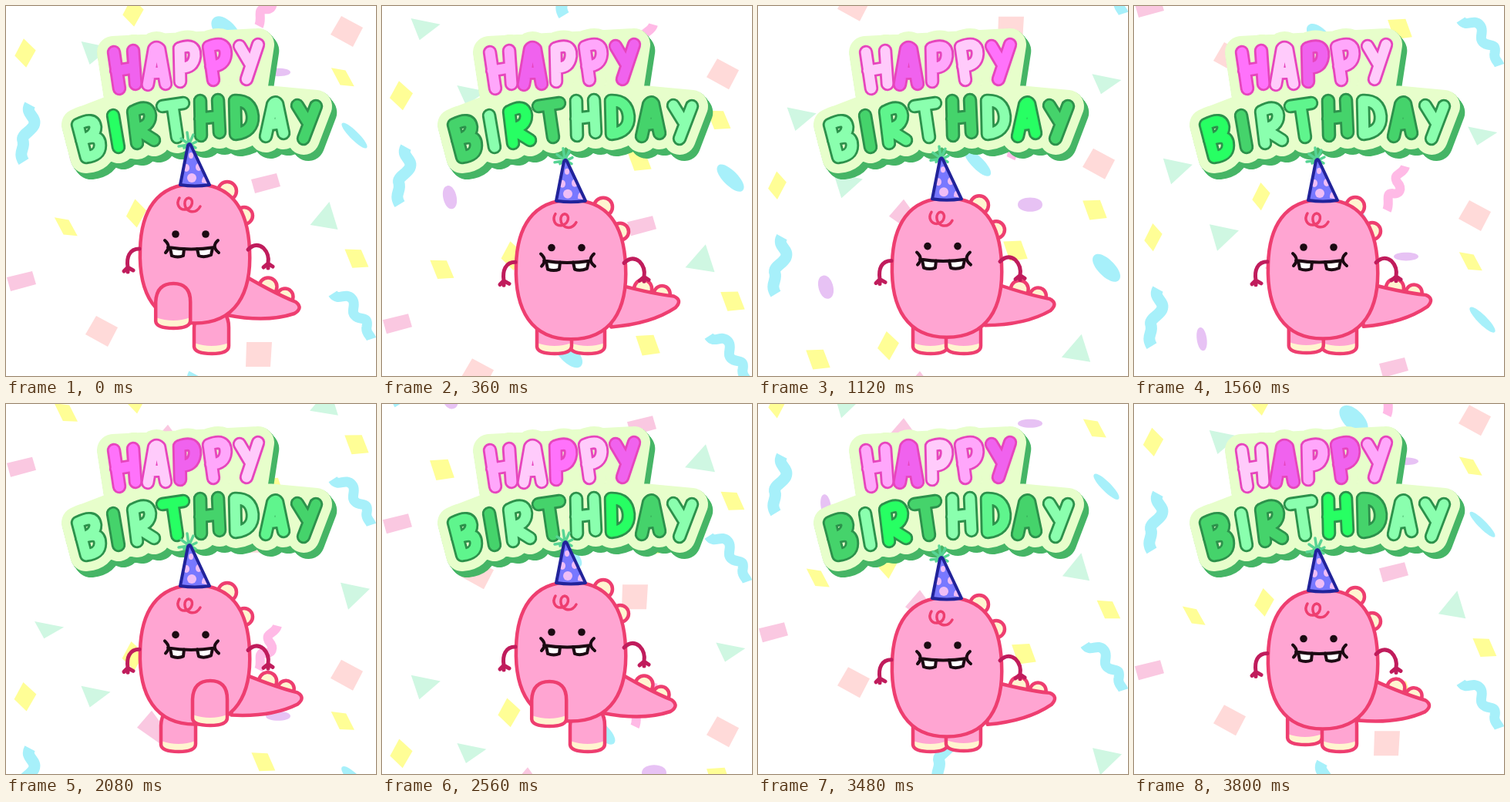
Animation of 480x480 px, one loop 3840 ms. Source, as an HTML page:

```html
<!DOCTYPE html>
<html lang="en">
<head>
<meta charset="utf-8">
<title>Happy Birthday</title>
<style>
html, body { margin: 0; width: 100%; height: 100%; overflow: hidden; background: #fff; }
svg { display: block; width: 100vw; height: 100vh; }
path, line { stroke-linecap: round; stroke-linejoin: round; }
.ink { fill: none; }
.ribbon { fill: none; stroke-linecap: butt; }
.skin { fill: #ffa5d2; stroke: #ee3e70; stroke-width: 4.5; }
.horn { fill: #fff5d0; stroke: #ee3e70; stroke-width: 4.5; }
.arm { fill: none; stroke: #c01c5c; stroke-width: 5; }
.face { fill: none; stroke: #1b0a12; stroke-width: 4; }
</style>
</head>
<body>
<svg viewBox="0 0 480 480" role="img" aria-label="Happy Birthday">
  <defs>
    <g id="leg">
      <path fill="#ffa5d2" d="M-22 -9 V-34 Q-21 -58 1 -58 Q23 -58 23 -34 V-10 Q23 0 1 0 Q-21 0 -22 -9Z"/>
      <path fill="#fff5d0" d="M-22 -14 Q1 -6 23 -14 V-10 Q23 0 1 0 Q-21 0 -22 -9Z"/>
      <path fill="none" stroke="#ee3e70" stroke-width="4.5" d="M-22 -9 V-34 Q-21 -58 1 -58 Q23 -58 23 -34 V-10 Q23 0 1 0 Q-21 0 -22 -9Z"/>
    </g>
  </defs>
  <g id="confetti"></g>
  <g id="sign"></g>
  <g id="back"></g>
  <g id="tail">
    <circle class="horn" cx="340" cy="364" r="11.5"/>
    <circle class="horn" cx="362" cy="377" r="10.5"/>
    <path class="skin" d="M298 343 Q344 371 376 384 Q386 392 374 399 Q338 411 287 401Z"/>
  </g>
  <g id="body">
    <circle class="horn" cx="287" cy="240" r="12"/>
    <circle class="horn" cx="309" cy="272" r="11"/>
    <path class="skin" d="M245 231 C295 231 314 267 316 316 C319 374 297 411.500 245 411.500 C194 411.500 172 374 174 316 C175 267 195 231 245 231Z"/>
    <path fill="none" stroke="#ee3e70" stroke-width="3.5" d="M225 249 C220 257 225 265 233 264 C243 262 244 250 237 249 C230 250 230 262 238 266 Q247 269 252 260"/>
    <g id="hat">
      <path fill="none" stroke="#57d494" stroke-width="3.5" d="M237 180 L224 182 M237 179 L227 172 M237 178 L235 164 M238 178 L243 167 M239 180 L247 176 M237 180 L231 184 M239 180 L246 184"/>
      <path fill="#7878ff" d="M236 181 Q238 177 240 181 L264 232 Q245 235 226 232Z"/>
      <g fill="#efbdf6">
        <ellipse cx="240" cy="194" rx="3" ry="4"/><ellipse cx="234" cy="210" rx="4" ry="5"/>
        <ellipse cx="250" cy="209" rx="4" ry="5"/><circle cx="241" cy="223" r="6"/>
        <path d="M254 229 Q254 219 260 222 L263 231Z"/>
      </g>
      <path fill="none" stroke="#21239a" stroke-width="4" d="M236 181 Q238 177 240 181 L264 232 Q245 235 226 232Z"/>
    </g>
  </g>
  <g id="front"></g>
  <g id="look">
    <circle cx="220" cy="296" r="4.8" fill="#1b0a12"/><circle cx="259" cy="296" r="4.8" fill="#1b0a12"/>
    <g class="face">
      <path fill="#fff" d="M213 314 L215 324 Q223 327 230 324 L231 315 M248 315 L250 324 Q257 327 266 323 L268 314"/>
      <path d="M210 313 Q240 318 271 313 M206 304 Q215 312 207 320 M275 304 Q266 312 276 320"/>
    </g>
  </g>
  <g id="arms" class="arm">
    <path d="M173 315 C160 315 156 326 158 339 M158 339 L153 344 M158 339 L158 345 M158 339 L165 343"/>
    <path d="M314 316 Q324 306 334 314 Q342 322 340 334 M340 334 L334 339 M340 334 L340 340 M340 334 L346 338"/>
  </g>
</svg>
<script>
const $ = id => document.getElementById(id);
const FRAMES = 96, STEP = 40;
const FALL = 6.13, SPAN = 594;

function add(parent, tag, attrs) {
  const el = document.createElementNS('http://www.w3.org/2000/svg', tag);
  for (const k in attrs) el.setAttribute(k, attrs[k]);
  parent.append(el);
  return el;
}

// Confetti: shape, colour, tumble axis angle, ribbon width
const YELLOW = '#fffe96', BLUE = '#a7f0fa', PINK = '#fac8e1', MINT = '#cff7e2', SALMON = '#ffdad9', LILAC = '#e7c2f4';
const kinds = {
  gem: ['M-3 -19 L15 -3 L2 19 L-15 3Z', YELLOW, 20],
  chip: ['M-16 -12 L8 -14 L16 10 L-8 14Z', YELLOW, -45],
  box: ['M-7 -20 L21 -5 L8 20 L-21 4Z', SALMON, 0],
  tile: ['M-16 -16 L17 -16 L15 16 L-17 16Z', SALMON, 0],
  slip: ['M-19 -5 L14 -13 L19 4 L-14 13Z', PINK, 0],
  slab: ['M-3 -22 L21 11 L8 21 L-22 0Z', PINK, 0],
  disc: ['M-16 -16 C-4 -28 28 4 16 16 C4 28 -28 -4 -16 -16Z', BLUE, -45],
  egg: ['M-4 -15 C10 -17 18 13 4 15 C-10 17 -18 -13 -4 -15Z', LILAC, 0],
  bean: ['M-16 0 C-16 -14 16 -14 16 0 C16 14 -16 14 -16 0Z', LILAC, 90],
  up: ['M7 -18 L19 18 L-20 12Z', MINT, 0],
  flag: ['M-19 -17 L19 -9 L-9 18Z', MINT, 100],
  wave: ['M4 -37 C-3 -24 14 -22 9 -10 C5 -2 -8 2 -5 10 C-2 20 -12 24 -4 37', BLUE, 0, 15],
  curl: ['M-26 -29 C-19 -18 -10 -32 -1 -22 C6 -14 -6 -4 6 2 C14 5 20 2 18 14 C16 22 22 24 24 30', BLUE, 0, 13],
  worm: ['M11 -29 C8 -18 -6 -20 0 -9 C8 0 4 8 -6 6 C-16 6 -8 18 -13 28', '#ffbae6', 0, 12]
};
// kind, x, y, tumble depth, widest moment, tumble period
const bits = `gem 25 61 .3 10 48.5|gem 165 8 .3 10 48.5|box 442 33 0 0 97|chip 437 93 .45 20 48.5|
disc 452 168 .6 20 48.5|wave 27 165 0 0 97|up 413 272 .1 17 48.5|chip 455 328 .3 30 97|curl 450 402 0 0 97|
slip 20 357 0 0 97|chip 78 287 .45 20 48.5|gem 169 269 .2 17 48.5|slip 337 230 0 0 97|box 124 422 0 0 97|
tile 328 452 0 0 97|bean 353 86 .55 20 48.5|worm 341 -2 0 0 97|flag 117 61 .3 36 48.5|egg 88 193 .45 20 48.5|
disc 242 396 .4 0 48.5|wave 240 514 0 0 97|disc 285 32 .4 0 48.5|chip 334 146 .3 20 48.5|
chip 345 385 .2 0 48.5|flag 453 524 .4 17 35|flag 57 569 .4 0 35|slab 192 101 0 0 97|slab 213 324 0 0 97`
  .split('|').map(row => {
    const [kind, ...n] = row.trim().split(' ');
    const [d, color, axis, width] = kinds[kind];
    const [x, y, depth, peak, period] = n.map(Number);
    const look = width ? { class: 'ribbon', stroke: color, 'stroke-width': width } : { fill: color };
    return { x, y, depth, peak, period, axis, el: add($('confetti'), 'path', { d, ...look }) };
  });

// Bubble lettering from stroked skeletons
const happy = [
  'M140 60 L147 107 M165 58 L168 101 M143 84 L166 80',
  'M184 102 L192 56 Q195 52 199 56 L207 101 M188 87 L204 86',
  'M225 55 L226 98 M225 55 Q246 47 245 65 Q243 81 227 80',
  'M263 53 L269 96 M263 53 Q285 44 285 62 Q284 78 266 78',
  'M303 52 L316 74 M327 50 L312 95'
];
const birthday = [
  'M93 154 L104 196 M93 154 Q114 143 116 157 Q116 169 98 174 Q122 164 122 181 Q122 194 104 196',
  'M139 142 L146 183',
  'M165 137 L170 178 M165 137 Q185 126 187 142 Q187 157 168 159 L192 174',
  'M203 130 L230 126 M216 129 L222 170',
  'M252 123 L253 168 M275 122 L277 164 M252 146 L276 143',
  'M297 123 L298 166 Q321 163 320 143 Q318 122 297 123',
  'M337 169 L346 128 Q349 123 352 127 L360 165 M341 154 L356 152',
  'M378 129 L391 150 M402 130 L386 172'
];
const sheet = happy.concat(birthday).join(' ') + ' M139 60 L327 50 L316 122 L402 130 L390 150 L240 148 L104 178 L93 154 L150 132Z';
for (let i = 9; i >= 0; i--) {
  const c = i ? '#46b566' : '#e7fecb';
  add($('sign'), 'path', { d: sheet, fill: c, stroke: c, 'stroke-width': 42, transform: `translate(${i * .7} ${i * .9})` });
}
const word = (list, edge) => list.map(d => {
  add($('sign'), 'path', { d, class: 'ink', stroke: edge, 'stroke-width': 18.5 });
  return add($('sign'), 'path', { d, class: 'ink', stroke: edge, 'stroke-width': 12.8 });
});
const top5 = word(happy, '#e645bd'), low8 = word(birthday, '#2c914b');
const tones = { v: '#f062ee', h: '#ff72fb', p: '#ffa7fb', w: '#ffcbfb', d: '#45d36b', m: '#8affae', n: '#5ff58d', b: '#27ff63' };
const topMix = 'hwvpw vpwhw pvwpv hwvpw wvpvp pwhwv wvpwh phwvp'.split(' ');
const lowMix = 'bdmndmdm mbdmddmd dmbdmndm mdmbdmnd dmdmbdmm ndmdmbdm mdnmdmbd dmdmndmb'.split(' ');

// Piecewise easing through [frame, value] pairs
function track(u, keys) {
  let i = 1;
  while (i < keys.length - 1 && u > keys[i][0]) i++;
  const [a, p] = keys[i - 1], [b, q] = keys[i];
  return p + (q - p) * (u - a) / (b - a);
}
const bob = [[0, 0], [1, 0], [4, 4], [7, 20], [10, 21], [13, 17], [15, 10], [16, 0]];
const sway = [[0, 0], [1, -1], [4, -8], [7, -16], [10, -15], [15, -6], [16, 0]];
const sag = [[0, 0], [1, 0], [4, 2], [7, 14], [10, 15], [15, 9], [16, 0]];
const liftL = [[0, 33], [2, 35], [4, 34], [7, 1], [8, 0], [29, 0], [31, 9], [32, 33]];
const liftR = [[0, 22], [1, 28], [4, 34], [7, 1], [8, 0], [29, 0], [31, 5], [32, 22]];
const legs = [
  { x: 223, keys: liftL, shift: 0, lean: -7 },
  { x: 266, keys: liftR, shift: 16, lean: -2 }
].map(leg => ({ ...leg, el: add($('back'), 'use', { href: '#leg' }) }));

const move = (el, v) => el.setAttribute('transform', v);

function draw(f) {
  for (const b of bits) {
    const y = (b.y + FALL * f + 60) % SPAN - 60;
    const s = 1 - b.depth * (1 - Math.cos((f - b.peak) * 2 * Math.PI / b.period)) / 2;
    const a = b.axis;
    move(b.el, `translate(${b.x} ${y}) rotate(${a}) scale(${s} 1) rotate(${-a})`);
  }

  const mix = (Math.floor(f / 5) + 1) % 8;
  top5.forEach((el, i) => el.setAttribute('stroke', tones[topMix[mix][i]]));
  low8.forEach((el, i) => el.setAttribute('stroke', tones[lowMix[mix][i]]));

  const u = f % 16, dy = track(u, bob), turn = track(u, sway);
  move($('body'), `translate(0 ${dy})`);
  move($('look'), `translate(0 ${dy * .85})`);
  move($('arms'), `translate(0 ${dy * .84})`);
  move($('tail'), `translate(${-turn * .38} ${track(u, sag)}) rotate(${turn} 292 385)`);

  for (const leg of legs) {
    const lift = track((f + leg.shift) % 32, leg.keys);
    const layer = $(lift > 14 ? 'front' : 'back');
    if (leg.el.parentNode !== layer) layer.append(leg.el);
    move(leg.el, `translate(${leg.x + leg.lean * lift / 34} ${451 - lift})`);
  }
}

function tick() {
  draw(Math.floor(performance.now() / STEP) % FRAMES);
  requestAnimationFrame(tick);
}
tick();
</script>
</body>
</html>
```
